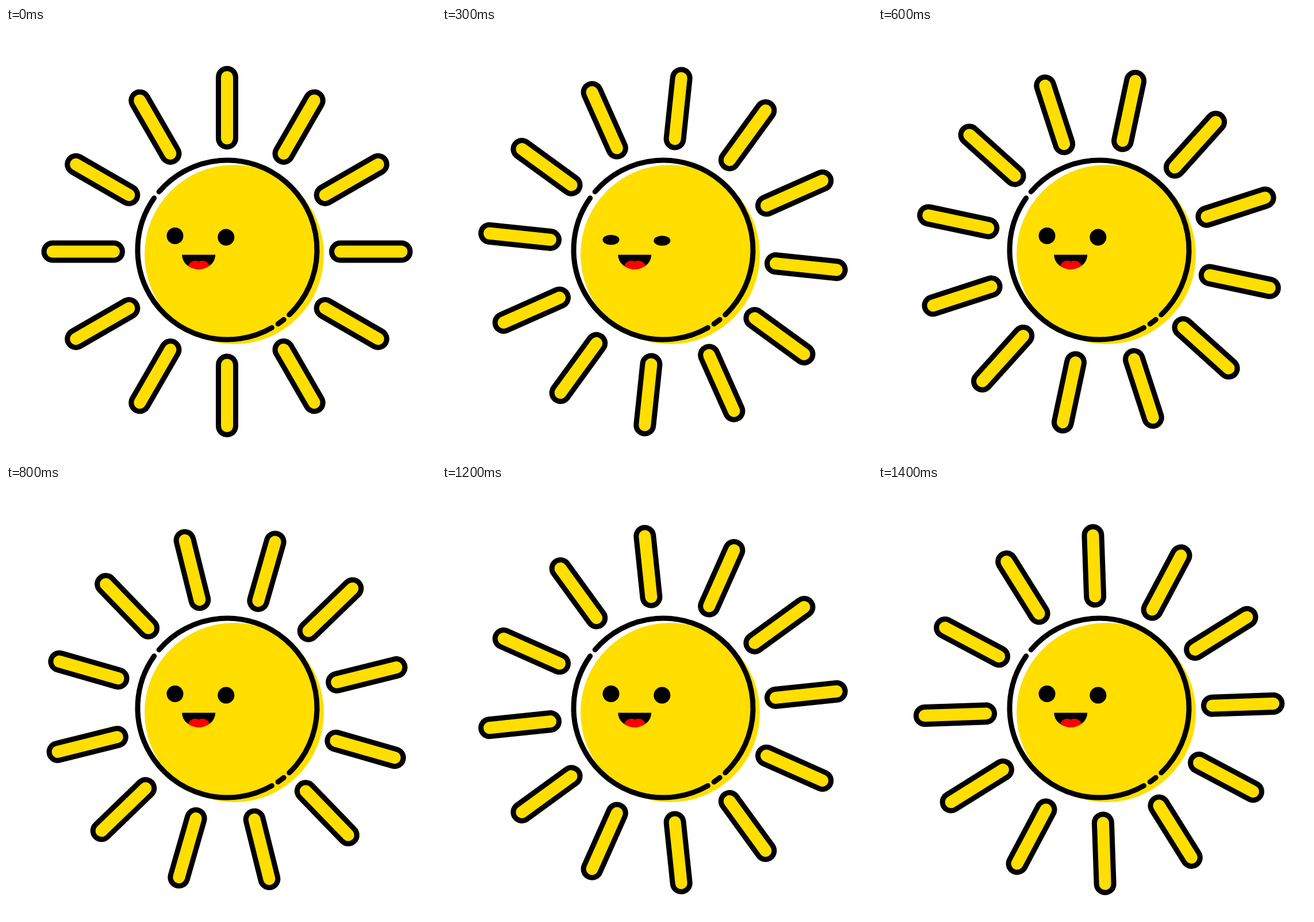
These frames come from a looping animation (748 by 748 pixels, 1.5 s). An HTML page with a canvas:

```html
<!DOCTYPE html>
<html lang="en">
<head>
<meta charset="utf-8">
<title>Smiling sun</title>
<style>
  html, body { margin: 0; width: 100%; height: 100%; overflow: hidden; background: #fff; }
  canvas { display: block; width: 748px; height: 748px; }
</style>
</head>
<body>
<canvas id="stage" width="748" height="748"></canvas>
<script>
const ctx = document.getElementById('stage').getContext('2d');
const YELLOW = '#ffde00', BLACK = '#000', RED = '#f00';
const LOOP = 1500, STEP = 100, RAYS = 12, RAD = Math.PI / 180;
ctx.lineCap = 'round';

function ellipse(x, y, rx, ry, color) {
  ctx.fillStyle = color;
  ctx.beginPath();
  ctx.ellipse(x, y, rx, ry, 0, 0, 2 * Math.PI);
  ctx.fill();
}

function arc(from, to) {
  ctx.beginPath();
  ctx.arc(385, 386, 156, from * RAD, to * RAD);
  ctx.stroke();
}

function drawRays(angle) {
  for (let i = 0; i < RAYS; i++) {
    ctx.save();
    ctx.translate(384.5, 389);
    ctx.rotate((angle + i * 360 / RAYS) * RAD);
    ctx.beginPath();
    ctx.moveTo(0, -197);
    ctx.lineTo(0, -303.5);
    for (const [width, color] of [[39, BLACK], [21, YELLOW]]) {
      ctx.lineWidth = width;
      ctx.strokeStyle = color;
      ctx.stroke();
    }
    ctx.restore();
  }
}

function drawBody() {
  ellipse(397, 394, 156, 156, YELLOW);
  ctx.lineWidth = 9;
  ctx.strokeStyle = BLACK;
  arc(60.2, 215.3);
  arc(220.4, 406.3);
  arc(51, 55.6);
}

function drawMouth() {
  ctx.save();
  ctx.beginPath();
  ctx.ellipse(335.2, 394.5, 29, 25.2, 0, 0, Math.PI);
  ctx.fillStyle = BLACK;
  ctx.fill();
  ctx.clip();
  ctx.fillStyle = RED;
  ctx.fill(new Path2D('M316 422 L317 414 C320 404 331 403 335.5 406.5 C340 403 351 404 354 414 L355 422 Z'));
  ctx.restore();
}

// The eyes squash towards a shared lower line.
function drawEyes(open) {
  const base = 379;
  for (const [x, y] of [[294, 361.5], [382.8, 364]])
    ellipse(x, base - (base - y) * open, 14.5, 14.5 * open, BLACK);
}

function eyeOpenness(t) {
  if (t < 200) return 1 - 0.6 * t / 200;
  return Math.min(1, 0.4 + 0.6 * (t - 200) / 300);
}

function draw(now) {
  const t = Math.floor(now % LOOP / STEP) * STEP;
  ctx.clearRect(0, 0, 748, 748);
  drawRays(t / LOOP * 360 / RAYS);
  drawBody();
  drawMouth();
  drawEyes(eyeOpenness(t));
}

let start;
function tick(now) {
  start ??= now;
  draw(now - start);
  requestAnimationFrame(tick);
}
requestAnimationFrame(tick);
</script>
</body>
</html>
```
